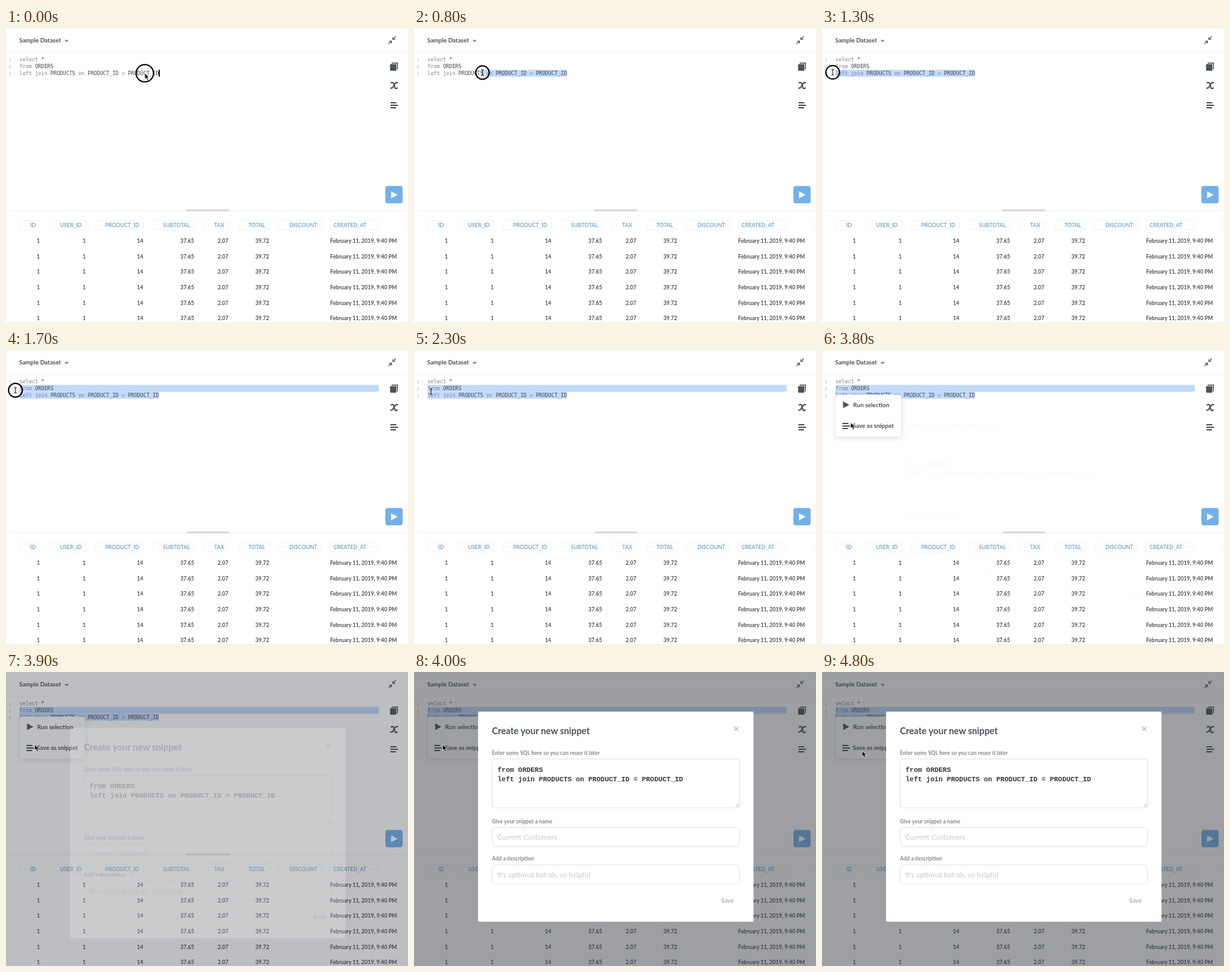
Animation, 640 px wide and 468 px high, one loop 4.9 s. Source, as an HTML page:

```html
<!DOCTYPE html>
<html lang="en">
<head>
<meta charset="utf-8">
<title>Save as snippet</title>
<style>
  html, body { margin: 0; width: 100%; height: 100%; overflow: hidden; background: #fff; }
  svg { display: block; width: 640px; height: 468px; }
  text { font: bold 8.57px Lato, sans-serif; fill: #4c5157; white-space: pre; }
  .menu text, .title { font-size: 9.6px; }
  .head { fill: #7fa9c9; }
  .end { text-anchor: end; }
  .code { font: 8.2px "DejaVu Sans Mono", monospace; fill: #45484d; }
  .key { fill: #85808e; }
  .num { font: 6.5px "DejaVu Sans Mono", monospace; fill: #b4b8bc; }
  .box { fill: #fff; stroke: #e1e3e5; }
  .label { fill: #84898f; }
  .hint { font-weight: normal; font-size: 11.45px; fill: #c6c9cc; }
  .sql { font: bold 10.95px "Liberation Mono", monospace; fill: #35383c; }
  .dark { fill: #4c5157; }
  .line { fill: none; stroke: #4c5157; }
  .menu { filter: drop-shadow(0 2px 5px rgba(0, 0, 0, .13)); }
</style>
</head>
<body>
<svg viewBox="0 0 640 468">
  <defs>
    <path id="lines" class="line" stroke-width="2.2" d="M0 1h9.500M0 5h12M0 9h9"/>
  </defs>

  <path d="M0 .5H640M0 38.5H640" stroke="#f3f3f3"/>
  <text class="title" x="21" y="23.3">Sample Dataset</text>
  <path class="line" d="M94 19l2.5 2.5L99 19" stroke-width="1.2"/>

  <path class="line" stroke-width="1.2"
    d="M620.5 13.5L616 18M615.8 14.5v3.7h3.8M609 25.5l4.5-4.5M613.7 24.5v-3.7h-3.8"/>
  <path class="line" stroke-width="1.4" d="M614 55.8H623.3V66"/>
  <rect class="dark" x="611.5" y="57.5" width="10" height="10.5" rx="1"/>
  <path class="line" stroke-width="2.2"
    d="M612.5 88q3.500-3 5 1l1.500 5.500q1 3.500 4.500 .5M624 87.500q-2.500-2-5 1.500l-3 5q-2 3-4 1"/>
  <use href="#lines" x="612" y="118"/>

  <rect x="604" y="251.5" width="27.5" height="27.5" rx="4" fill="#72b0ea"/>
  <path d="M613 260v11l10.5-5.5z" fill="#fff"/>

  <g fill="#c1dbfc">
    <rect id="sel2" x="21.5" y="55.5" width="572" height="11"/>
    <rect id="sel3" y="66.5" height="11"/>
  </g>
  <g id="editor"></g>
  <rect id="caret" x="243" y="66.5" width="1.8" height="11"/>

  <path d="M8 290.5H640" stroke="#efefef"/>
  <rect x="287" y="288.5" width="69" height="3.5" rx="1.7" fill="#dcdcdc"/>
  <g id="table"></g>

  <g id="menu" class="menu">
    <rect x="22" y="71" width="104" height="67" rx="4" fill="#fff"/>
    <path class="dark" d="M33.5 81.800v10.800l10-5.400z"/>
    <text x="49.5" y="90.6">Run selection</text>
    <use href="#lines" x="32.5" y="116"/>
    <text x="49" y="124">Save as snippet</text>
  </g>

  <rect id="shade" width="640" height="468" fill="#34373f"/>

  <g id="modal">
    <rect x="102" y="63" width="438.5" height="334.5" rx="2" fill="#fff"/>
    <text x="124" y="99" style="font-size: 14.4px">Create your new snippet</text>
    <path d="M510 87l6.5 6.5m0-6.5l-6.5 6.5" stroke="#bcc0c4" stroke-width="1.7"/>
    <text class="label" x="124" y="131.7">Enter some SQL here so you can reuse it later</text>
    <rect class="box" x="124.5" y="138.5" width="394" height="77.5" rx="3"/>
    <path d="M512 214.5l5-5M515 214.5l2-2" stroke="#8b8f93" stroke-width=".8"/>
    <text class="sql" x="133" y="158.5">from ORDERS</text>
    <text class="sql" x="133" y="173.5">left join PRODUCTS on PRODUCT_ID = PRODUCT_ID</text>
    <text class="label" x="124" y="240.7">Give your snippet a name</text>
    <rect class="box" x="124.5" y="247.5" width="394" height="30" rx="4"/>
    <text class="hint" x="132.5" y="267">Current Customers</text>
    <text class="label" x="124" y="300.2">Add a description</text>
    <rect class="box" x="124.5" y="307" width="394" height="30" rx="4"/>
    <text class="hint" x="132.5" y="326.5">It's optional but oh, so helpful</text>
    <text x="489" y="367.4" style="font-size: 9.5px; fill: #a9aeb3">Save</text>
  </g>

  <circle id="ring" fill="none" stroke="#000" stroke-width="2"/>
  <path id="arrow" d="M0 0v9.300l2.200-2 1.700 3.900 1.800-.8-1.700-3.700h3z" stroke="#fff" stroke-width=".7"/>
  <path id="beam" d="M-2-4.500q2 0 2 1.200v6.600q0 1.200-2 1.200M2-4.500q-2 0-2 1.200M2 4.500q-2 0-2-1.200" fill="none" stroke="#000"/>
</svg>

<script>
const $ = id => document.getElementById(id);
const LOOP = 4900, STEP = 100, LINE_END = 243.5, TEXT_X = 21.5;

// SQL editor: lower-case words are keywords
$('editor').innerHTML = [
  'select *', 'from ORDERS', 'left join PRODUCTS on PRODUCT_ID = PRODUCT_ID'
].map((line, i) => {
  const y = 53 + 11 * i;
  const code = line.replace(/[a-z]+|=/g, '<tspan class="key">$&</tspan>');
  return `<text class="num" x="4.5" y="${y - .5}">${i + 1}</text>
    <text class="code" x="${TEXT_X}" y="${y}">${code}</text>`;
}).join('');

// Result columns: name, left and right edge, value
const columns = [
  ['ID', 22, 54, '1'], ['USER_ID', 69, 127, '1'], ['PRODUCT_ID', 142, 218.5, '14'],
  ['SUBTOTAL', 233, 299.5, '37.65'], ['TAX', 314, 354, '2.07'],
  ['TOTAL', 372, 419, '39.72'], ['DISCOUNT', 434, 502, '']
];
const date = 'February 11, 2019, 9:40 PM';
const pill = (x, w) =>
  `<rect x="${x}" y="306.5" width="${w}" height="15" rx="3" fill="none" stroke="#f2f3f4"/>`;
const mark = x =>
  `<path d="M${x} 313.5l1.5 1.5 1.5-1.5" fill="none" stroke="#dfe5ea" stroke-width=".8"/>`;
const rowY = i => 342.2 + 24.6 * i;
const rows = [0, 1, 2, 3, 4, 5];

$('table').innerHTML = columns.map(([name, left, right, value]) =>
  pill(left, right - left) + mark(left + 7) +
  `<text class="head end" x="${right - 6.5}" y="317.4">${name}</text>` +
  rows.map(i => `<text class="end" x="${right}" y="${rowY(i)}">${value}</text>`).join('')
).join('') + pill(515.5, 76) + mark(581) + pill(637, 20) +
  '<text class="head" x="521.5" y="317.4">CREATED_AT</text>' +
  rows.map(i => `<text x="516" y="${rowY(i)}">${date}</text>`).join('');

// Linear interpolation between [time, ...values] keys
function track(keys, t) {
  const n = keys.findIndex(k => k[0] > t);
  if (n < 0) return keys[keys.length - 1].slice(1);
  if (n === 0) return keys[0].slice(1);
  const a = keys[n - 1], b = keys[n], p = (t - a[0]) / (b[0] - a[0]);
  return a.slice(1).map((v, i) => v + (b[i + 1] - v) * p);
}

const mouseKeys = [
  [0, 221, 72], [300, 246, 72], [700, 130, 71], [1200, 25, 70.5], [1300, 17, 70.5],
  [1700, 15, 64], [1900, 15, 64], [2300, 27, 66], [2700, 27, 66], [3000, 31, 76],
  [3600, 45.5, 115.5], [4400, 45.5, 115.5], [4800, 64, 125.7]
];
const ringKeys = [[0, 13.8, 1], [300, 10.5, 1], [1800, 11, 1], [2100, 11, 0]];
const menuKeys = [[2400, 0], [2600, 1]];
const shadeKeys = [[3800, 0], [3900, .32], [4000, .48]];
const modalKeys = [[3700, 27, 0], [3800, 27, .02], [3900, 26, .2], [4000, 0, 1]];

function draw(now) {
  const t = Math.floor(now % LOOP / STEP) * STEP;
  const [x, y] = track(mouseKeys, t);
  const [radius, ringAlpha] = track(ringKeys, t);
  const [drop, modalAlpha] = track(modalKeys, t);
  const set = (id, attrs) => {
    for (const name in attrs) $(id).setAttribute(name, attrs[name]);
  };
  const onLine2 = t > 1300 && (t >= 1700 || y < 67);
  const start = onLine2 ? TEXT_X : Math.max(TEXT_X, Math.min(LINE_END, x));
  const isArrow = t < 100 || (t > 2500 && y > 70);

  set('caret', { opacity: t < 400 ? 1 : 0 });
  set('sel2', { opacity: onLine2 ? 1 : 0 });
  set('sel3', { x: start, width: t < 300 ? 0 : LINE_END - start });
  set('ring', { cx: x, cy: y, r: radius, opacity: ringAlpha });
  for (const [id, shown] of [['arrow', isArrow], ['beam', !isArrow]])
    set(id, { transform: `translate(${x} ${y})`, opacity: shown ? 1 : 0 });
  set('menu', { opacity: track(menuKeys, t)[0] });
  set('shade', { opacity: track(shadeKeys, t)[0] });
  set('modal', { transform: `translate(0 ${drop})`, opacity: modalAlpha });
}

let origin;
function frame(now) {
  origin ??= now;
  draw(now - origin);
  requestAnimationFrame(frame);
}
draw(0);
requestAnimationFrame(frame);
</script>
</body>
</html>
```
